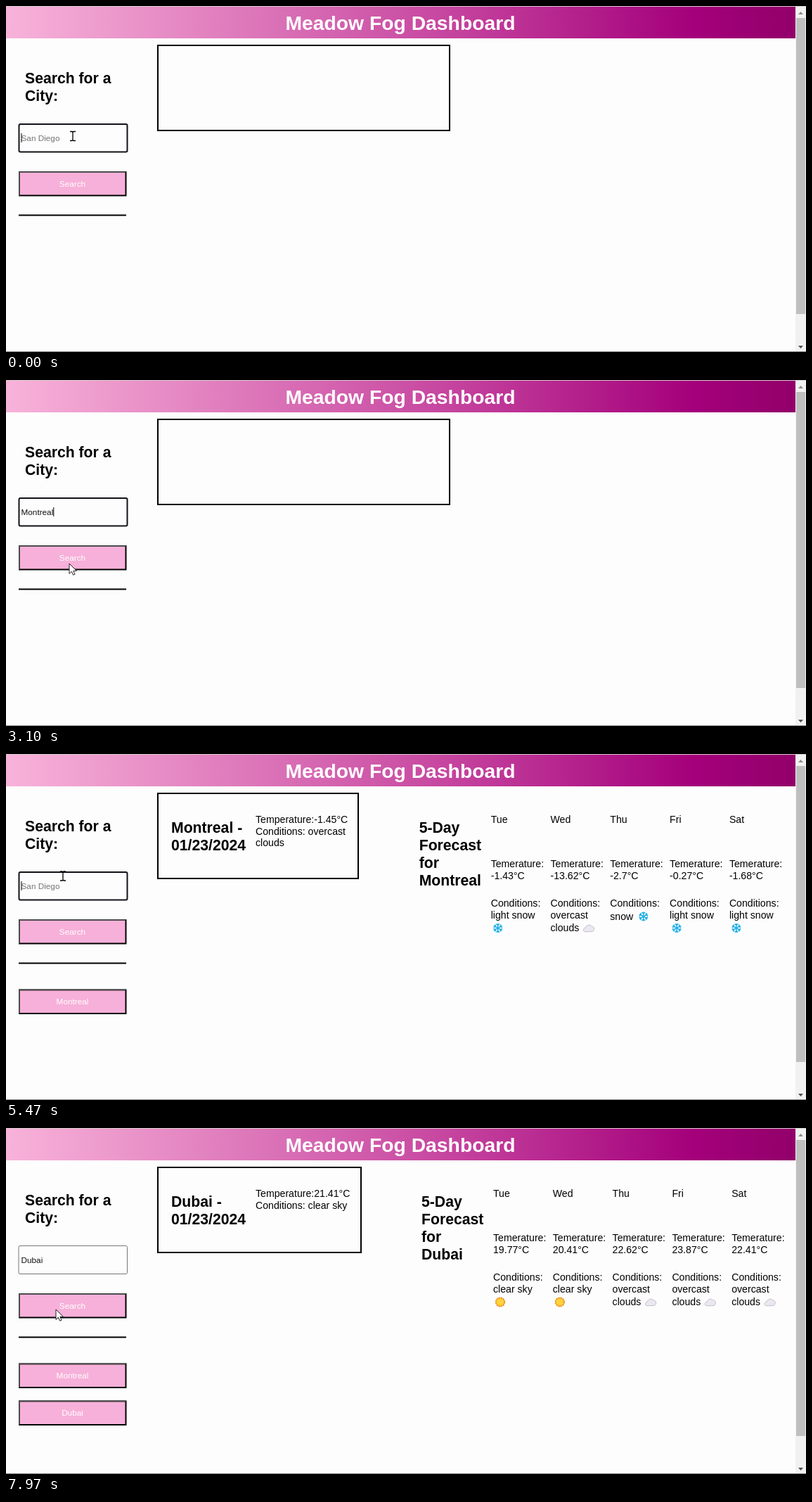
Write an HTML page that moves like this. It is 1138x492 px and loops after 8 s.

```html
<!DOCTYPE html>
<html lang="en">
<head>
<meta charset="utf-8">
<title>Weather dashboard</title>
<style>
  html, body { margin: 0; width: 100%; height: 100%; overflow: hidden; background: #fdfdfd; }
  svg { display: block; width: 1138px; height: 492px; }
  text { font: 14.13px "Liberation Sans", Arial, sans-serif; white-space: pre; }
  .h1 { font-size: 28.3px; font-weight: bold; fill: #fff; text-anchor: middle; }
  .h2 { font-size: 21.2px; font-weight: bold; }
  .field { font-size: 11.78px; }
  .label { font-size: 11.78px; fill: #fff; text-anchor: middle; }
  .box { fill: none; stroke: #000; stroke-width: 2; }
</style>
</head>
<body>
<svg viewBox="0 0 1138 492">
  <defs>
    <linearGradient id="bar">
      <stop offset="0" stop-color="#f8b3da"/>
      <stop offset=".5" stop-color="#cc52a6"/>
      <stop offset=".87" stop-color="#a4007b"/>
      <stop offset="1" stop-color="#92006a"/>
    </linearGradient>
    <g id="arm"><path d="M0 0V-6.6M-2.3-6L0-3.8L2.3-6" fill="none" stroke="#1eaee6" stroke-width="1.5"/></g>
    <g id="snow"></g>
    <path id="cloud" d="M-5 4.8C-9 4.5-8.500-.5-4.500-1C-4-5 2-6 4-3C8-3.500 9 3 5 4.500Z" fill="#ece8f1" stroke="#c6bdcc"/>
    <g id="sun">
      <circle r="6.300" fill="#ffd43c" stroke="#f08a24" stroke-width="1.600" stroke-dasharray="2.300 1"/>
      <circle r="5.500" fill="#ffd43c" stroke="#f59a2c" stroke-width=".8"/>
    </g>
  </defs>
  <rect width="1138" height="492" fill="#fdfdfd"/>
  <rect width="1138" height="1" fill="#d5c9c8"/>
  <rect y="1" width="1123" height="45" fill="url(#bar)"/>
  <text class="h1" x="561" y="34">Meadow Fog Dashboard</text>

  <rect x="1123" y="1" width="15" height="490" fill="#f1f1f1"/>
  <rect x="1124" y="17" width="13" height="421" fill="#bfbfbf"/>
  <path d="M1127 12h7l-3.500-4z" fill="#8d8d8d"/>
  <path d="M1127 483h7l-3.500 4z" fill="#505050"/>
  <rect y="491" width="1138" height="1" fill="#85807d"/>

  <text class="h2" x="27" y="110.300">Search for a</text>
  <text class="h2" x="27" y="135.300">City:</text>
  <rect id="input" fill="#fdfdfd"/>
  <text id="value" class="field" x="21.500" y="191.500"></text>
  <rect id="caret" y="181" width="1" height="13"/>
  <path class="box" d="M18 297.500H171"/>
  <g id="page"></g>

  <path id="beam" d="M-4-6.500H-1L0-5.500L1-6.500H4M0-5.500V5.500M-4 6.500H-1L0 5.500L1 6.500H4" fill="none" stroke="#000" stroke-width="1.300"/>
  <path id="arrow" d="M0 0V14.500L3.400 11.300L5.600 16.300L8 15.200L5.800 10.400H10.400Z" fill="#fff" stroke="#222"/>
</svg>
<script>
const LOOP = 8000, CLICK = [3420, 7450], SHOWN = [3650, 7650], REFOCUS = 4550;
const $ = id => document.getElementById(id);
const set = (el, attrs) => { for (const k in attrs) el.setAttribute(k, attrs[k]); };
const show = (el, on) => set(el, { visibility: on ? 'visible' : 'hidden' });

$('snow').innerHTML = [0, 60, 120, 180, 240, 300]
  .map(a => `<use href="#arm" transform="rotate(${a})"/>`).join('');

const lines = (x, y, step, rows, cls = '') => rows.map((row, i) =>
  `<text class="${cls}" x="${x}" y="${y + i * step}">${row}</text>`).join('');
const icon = (name, x, y) => `<use href="#${name}" x="${x}" y="${y}"/>`;

const button = (y, label) => `
  <rect x="18" y="${y}" width="153.500" height="35.500" fill="#000"/>
  <path d="M18 ${y}h153.500l-2 2H20v31.500l-2 2z" fill="#4c4c4c"/>
  <rect x="20" y="${y + 2}" width="149.500" height="31.500" fill="#f7b0d9"/>
  <text class="label" x="94.500" y="${y + 21.5}">${label}</text>`;
const frame = width => `<rect class="box" x="216" y="56" width="${width}" height="121"/>`;

// Each sky is its text lines, its icon and the icon's place in the column.
const skies = {
  light: [['light snow'], 'snow', 10, 247.500],
  snow: [['snow'], 'snow', 47.500, 231],
  over: [['overcast', 'clouds'], 'cloud', 54.500, 248],
  clear: [['clear sky'], 'sun', 10, 247.500]
};

function day(name, x, temp, sky) {
  const [words, pic, dx, y] = skies[sky];
  return lines(x, 98, 0, [name]) +
    lines(x, 161, 16.7, ['Temerature:', temp + '°C']) +
    lines(x, 217, 0, ['Conditions:']) +
    lines(x, sky === 'snow' ? 236 : 234, 18.3, words) +
    icon(pic, x + dx, y);
}

function report(city, width, x, now, temps, sky) {
  const names = ['Tue', 'Wed', 'Thu', 'Fri', 'Sat'];
  return frame(width) +
    lines(235, 112, 25, [city + ' -', '01/23/2024'], 'h2') +
    lines(355, 98, 16.7, now) +
    lines(x, 112, 25, ['5-Day', 'Forecast', 'for', city], 'h2') +
    names.map((n, i) => day(n, x + 102 + i * 84.8, temps[i], sky[i])).join('');
}

const pages = [
  frame(415),
  report('Montreal', 285, 587.7, ['Temperature:-1.45°C', 'Conditions: overcast', 'clouds'],
    [-1.43, -13.62, -2.7, -0.27, -1.68], ['light', 'over', 'snow', 'light', 'light']) +
    button(334.5, 'Montreal'),
  report('Dubai', 289, 591, ['Temperature:21.41°C', 'Conditions: clear sky'],
    [19.77, 20.41, 22.62, 23.87, 22.41], ['clear', 'clear', 'over', 'over', 'over']) +
    button(334.5, 'Montreal') + button(387.5, 'Dubai')
].map(p => button(235, 'Search') + p);

// Field edits as [time, value]; the caret blink restarts at each one.
const edits = [[0, '']];
const type = (word, start, step) => {
  for (let i = 1; i <= word.length; i++) edits.push([start + (i - 1) * step, word.slice(0, i)]);
};
type('Montreal', 1000, 155);
edits.push([REFOCUS, 'Montreal']);
for (let i = 7; i >= 0; i--) edits.push([4900 + (7 - i) * 45, 'Montreal'.slice(0, i)]);
type('Dubai', 6000, 160);

const path = [[0, 95, 185], [2400, 95, 185], [2950, 90, 261], [3750, 90, 261],
  [4300, 79, 179], [4400, 79, 179], [4700, 81, 173.5], [6960, 81, 173.5],
  [7350, 71, 258], [LOOP, 71, 258]];

function pointer(t) {
  const i = path.findIndex(p => p[0] > t);
  const [t0, x0, y0] = path[i - 1], [t1, x1, y1] = path[i];
  const u = (t - t0) / (t1 - t0), e = u * u * (3 - 2 * u);
  return [x0 + (x1 - x0) * e, y0 + (y1 - y0) * e];
}

let current = -1;
function draw(t) {
  const page = SHOWN.filter(s => t >= s).length;
  if (page !== current) $('page').innerHTML = pages[current = page];

  const focus = t < CLICK[0] || (t >= REFOCUS && t < CLICK[1]);
  set($('input'), focus
    ? { x: 18.5, y: 168, width: 154, height: 39.5, rx: 2, stroke: '#101218', 'stroke-width': 2 }
    : { x: 18, y: 167.5, width: 154.5, height: 40, rx: 2, stroke: '#767676', 'stroke-width': 1 });

  const [since, text] = edits.filter(e => e[0] <= t).pop();
  $('value').textContent = text || 'San Diego';
  set($('value'), { fill: text ? '#111' : '#757575' });
  set($('caret'), { x: 21.5 + (text ? $('value').getComputedTextLength() : 0) });
  show($('caret'), focus && (t - since) % 1000 < 500);

  const [x, y] = pointer(t), inField = y > 167 && y < 208;
  for (const id of ['beam', 'arrow']) {
    set($(id), { transform: `translate(${x} ${y})` });
    show($(id), inField === (id === 'beam'));
  }
}

const start = performance.now();
(function tick() {
  draw((performance.now() - start) % LOOP);
  requestAnimationFrame(tick);
})();
</script>
</body>
</html>
```
